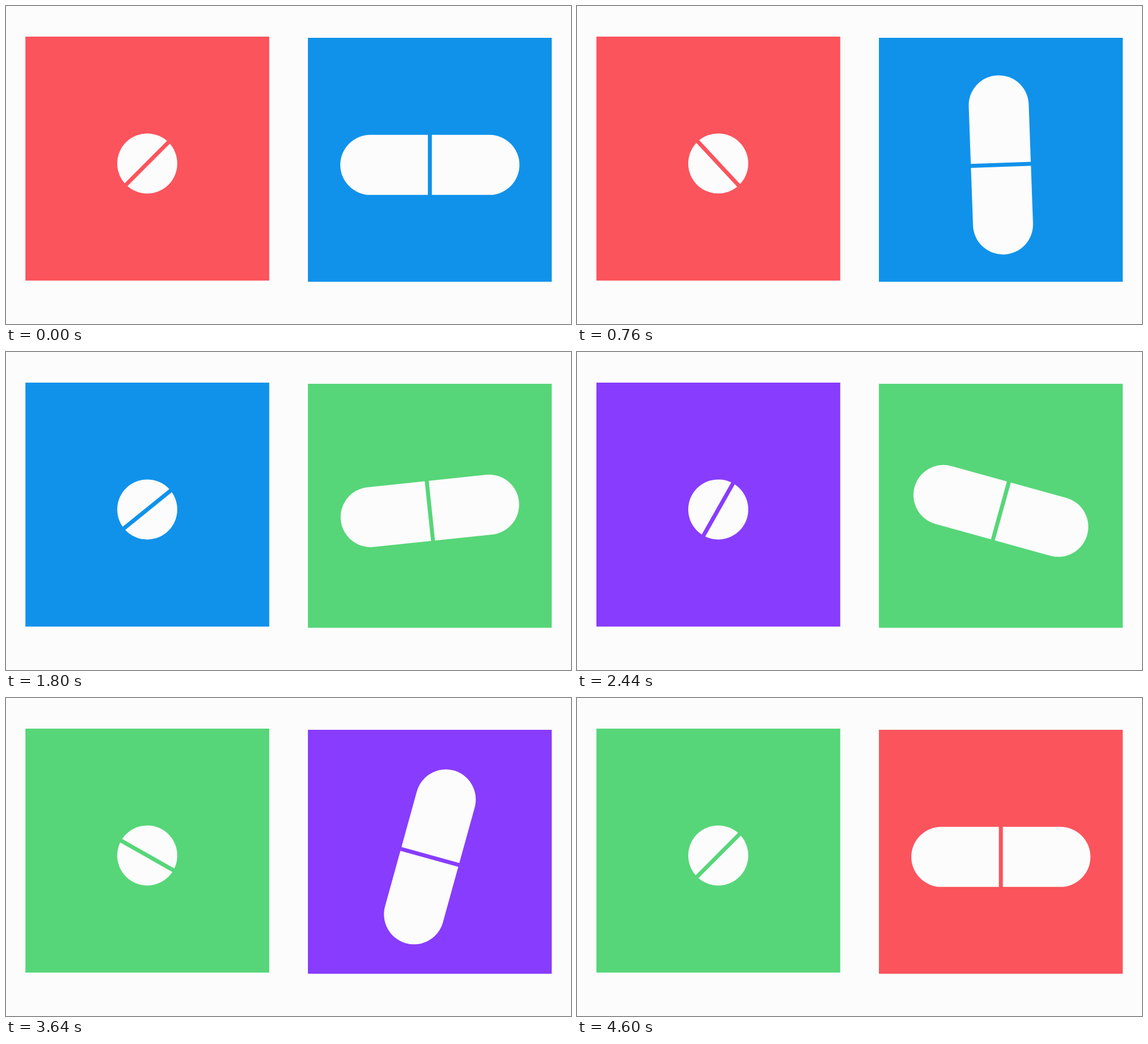
Animation, 960 px wide and 540 px high, one loop 4640 ms. Source, as an HTML page with a canvas:

```html
<!DOCTYPE html>
<html lang="en">
<head>
<meta charset="utf-8">
<title>Pills</title>
<style>
  html, body { margin: 0; width: 100%; height: 100%; overflow: hidden; background: #fcfcfc; }
  canvas { display: block; }
</style>
</head>
<body>
<canvas id="stage" width="960" height="540"></canvas>
<script>
const ctx = document.getElementById('stage').getContext('2d');
const LOOP = 4640, STEP = 40;
const PAPER = '#fcfcfc';
const RED = '#fb545c', BLUE = '#1092ea', GREEN = '#56d678', PURPLE = '#883cfd';

// Quarter turns: [start, end]
const TURNS = [[120, 1000], [1200, 2200], [2400, 3400], [3600, 4600]];

// Colour cuts: [time, colour]
const LEFT = [[0, RED], [880, BLUE], [2040, PURPLE], [3240, GREEN]];
const RIGHT = [[0, BLUE], [880, GREEN], [2680, PURPLE], [3880, RED]];

// Cubic ease-out that leaves rest with a small kick
function ease(x) {
  if (x <= 0) return 0;
  if (x >= 1) return 1;
  return 1 - Math.pow(1 - (x + 0.024) / 1.05, 3);
}

function angleAt(t) {
  return TURNS.reduce((sum, [a, b]) => sum + ease((t - a) / (b - a)), 0) * Math.PI / 2;
}

function colourAt(cuts, t) {
  return cuts.filter(cut => cut[0] <= t).pop()[1];
}

function panel(x, y, colour) {
  ctx.fillStyle = colour;
  ctx.fillRect(x, y, 414.3, 414.3);
}

// A rounded pill of the given half length, with a slit across it
function pill(x, y, half, angle, colour) {
  const r = 51, gap = 6.8;
  ctx.save();
  ctx.translate(x, y);
  ctx.rotate(angle);
  ctx.fillStyle = PAPER;
  ctx.beginPath();
  ctx.arc(r - half, 0, r, Math.PI / 2, Math.PI * 1.5);
  ctx.arc(half - r, 0, r, -Math.PI / 2, Math.PI / 2);
  ctx.fill();
  ctx.fillStyle = colour;
  ctx.fillRect(-gap / 2, -r - 2, gap, 2 * r + 4);
  ctx.restore();
}

function draw(t) {
  const turn = angleAt(t);
  const left = colourAt(LEFT, t), right = colourAt(RIGHT, t);
  ctx.fillStyle = PAPER;
  ctx.fillRect(0, 0, 960, 540);
  panel(33, 52, left);
  panel(513, 54, right);
  pill(240, 267.4, 51, Math.PI / 4 - turn, left);
  pill(720.2, 269.8, 152.2, turn, right);
}

const begin = performance.now();
function tick() {
  const t = (performance.now() - begin) % LOOP;
  draw(Math.floor(t / STEP) * STEP);
  requestAnimationFrame(tick);
}
tick();
</script>
</body>
</html>
```
